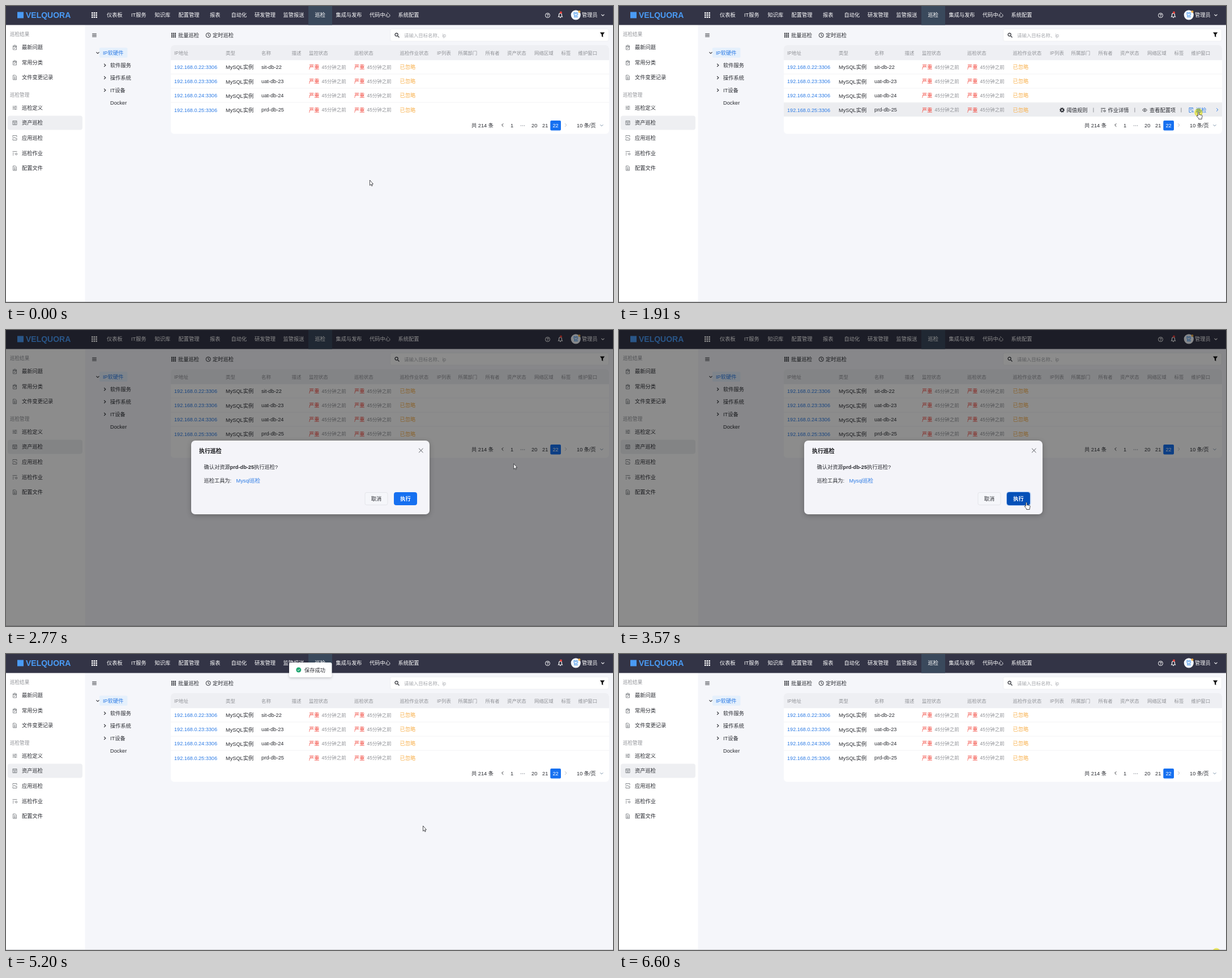
Recreate the animation shown at these times as an HTML page with a canvas. Size 1072x522 px, loop 6.76 s.

```html
<!DOCTYPE html>
<html lang="zh-CN">
<head>
<meta charset="utf-8">
<title>资产巡检</title>
<style>
html, body { margin: 0; width: 100%; height: 100%; overflow: hidden; background: #f5f6fa; }
canvas { display: block; width: 1072px; height: 522px; }
</style>
</head>
<body>
<canvas id="stage" width="1072" height="522"></canvas>
<script>
const ctx = document.getElementById('stage').getContext('2d');
const LOOP = 6760;
const FONT = '"Liberation Sans", "Noto Sans CJK SC", "Noto Sans CJK", sans-serif';
const BLUE = '#1670f0', LINK = '#2c7be5', INK = '#2b2d33', GREY = '#909297';
const BODY = 9.22, SMALL = 8.45;

// Pointer moves: start, last step, step count, x, y
const START = [642.5, 307];
const MOVES = [
  [420, 1040, 9, 1030, 175],
  [1120, 1290, 3, 1036, 176],
  [1440, 1910, 6, 1023.5, 187],
  [2470, 3080, 9, 719.5, 304],
  [5200, 5200, 1, 736.5, 303],
  [5278, 5810, 8, 943, 389],
  [5890, 6360, 7, 1055, 525]
];

const ICONS = {
  clip: 'M-3 -3H3V4H-3ZM-1 -4H1M-1.5 1L-.3 2L2 -1M-3 -1.5H3',
  doc: 'M-3 -4H1L3 -2V4H-3ZM-1.5 -1H1.5M-1.5 .8H1.5M-1.5 2.5H1.5',
  tune: 'M-4 -2.5H4M-4 0H4M-4 2.5H4M1.5 -3.5V-1.5M-1.5 -1V1M1 1.5V3.5',
  list: 'M-3.5 -3.5H3.5V3.5H-3.5ZM-3.5 -1.5H3.5M-1.8 .3H1.8M-1.8 2H1.8',
  app: 'M-3.5 -1.5V-4H3.5V-1.5M-3.5 1.5V4H3.5V1.5M-4 0H-1L0 -1.2L1 .8H4',
  job: 'M-4 -3H4M-4 0H-1M-4 3H-1.5M1 1.5A1.6 1.6 0 1 0 4.2 1.5A1.6 1.6 0 1 0 1 1.5',
  scan: 'M3 -1V-4H-3.5V4H0M-1.8 -2H1.5M-1.8 0H.5M1 2.3A1.3 1.3 0 1 0 3.6 2.3A1.3 1.3 0 1 0 1 2.3M3.4 3.2L4.4 4.2',
  eye: 'M-4 0Q0 -5.5 4 0Q0 5.5 -4 0ZM-1.1 0A1.1 1.1 0 1 0 1.1 0A1.1 1.1 0 1 0 -1.1 0',
  clock: 'M-4 0A4 4 0 1 0 4 0A4 4 0 1 0 -4 0M0 -2.5V.3L2 1.3',
  lens: 'M-3.5 -1A2.6 2.6 0 1 0 1.7 -1A2.6 2.6 0 1 0 -3.5 -1M1 1L4 4',
  bell: 'M-3.5 2.5H3.5L2.5 1V-1Q2.2 -3.6 0 -3.6Q-2.2 -3.6 -2.5 -1V1ZM-1 4H1',
  menu: 'M-3.8 -2.5H3.8M-3.8 0H3.8M-3.8 2.5H3.8',
  down: 'M-2.5 -1.2L0 1.3L2.5 -1.2',
  right: 'M-1.3 -2.7L1.4 0L-1.3 2.7',
  left: 'M1.3 -2.7L-1.4 0L1.3 2.7',
  cross: 'M-3.7 -3.7L3.7 3.7M3.7 -3.7L-3.7 3.7',
  tick: 'M-2 0L-.5 1.5L2 -1.3'
};
const ARROW = new Path2D('M0 0V9.4L2 7.6L3.4 10.5L4.7 9.9L3.4 7H6Z');
const HAND = new Path2D('M-1 .8Q0 -.7 1 .8V4.6L5.3 5.4Q6.8 5.8 6.6 7.3L5.7 11V12.5H.2V11.2L-3.2 7.3Q-3.4 5.7 -1.8 6.2L-1 7Z');

function text(s, x, y, color = INK, size = BODY, weight = '') {
  ctx.font = `${weight} ${size}px ${FONT}`;
  ctx.fillStyle = color;
  ctx.fillText(s, x, y + size * 0.37);
  return x + ctx.measureText(s).width;
}

function box(x, y, w, h, r, fill, stroke) {
  ctx.beginPath();
  ctx.roundRect(x, y, w, h, r);
  if (fill) { ctx.fillStyle = fill; ctx.fill(); }
  if (stroke) { ctx.strokeStyle = stroke; ctx.lineWidth = 1; ctx.stroke(); }
}

function disc(x, y, r, fill) {
  ctx.beginPath();
  ctx.arc(x, y, r, 0, Math.PI * 2);
  ctx.fillStyle = fill;
  ctx.fill();
}

function icon(name, x, y, color = INK, width = 0.9) {
  ctx.save();
  ctx.translate(x, y);
  ctx.strokeStyle = color;
  ctx.lineWidth = width;
  ctx.stroke(new Path2D(ICONS[name]));
  ctx.restore();
}

function dots(x, y, step, size, color) {
  ctx.fillStyle = color;
  for (let i = 0; i < 9; i++) {
    ctx.fillRect(x + (i % 3 - 1) * step - size / 2, y + (Math.floor(i / 3) - 1) * step - size / 2, size, size);
  }
}

function shadowed(blur, alpha, draw) {
  ctx.save();
  ctx.shadowColor = `rgba(0,0,0,${alpha})`;
  ctx.shadowBlur = blur;
  ctx.shadowOffsetY = 2;
  draw();
  ctx.restore();
}

function topBar() {
  box(0, 0, 1072, 33.4, 0, '#333446');
  box(534, 0, 42, 33.4, 0, '#3a495c');
  box(20, 10.5, 11, 11, 0, '#4a9bf5');
  text('VELQUORA', 35, 16, '#4a9bf5', 14, 'bold');
  dots(156, 16, 3.7, 2.5, '#fff');
  const tabs = [['仪表板', 178], ['IT服务', 221], ['知识库', 262.5], ['配置管理', 304.5], ['报表', 360],
    ['自动化', 397.5], ['研发管理', 439], ['监管报送', 489.5], ['巡检', 545.5], ['集成与发布', 582.5],
    ['代码中心', 642], ['系统配置', 692.5]];
  tabs.forEach(([s, x]) => text(s, x, 16, '#fff'));
  ctx.beginPath();
  ctx.arc(956.5, 16.5, 4, 0, 7);
  ctx.strokeStyle = '#fff';
  ctx.lineWidth = 1;
  ctx.stroke();
  text('?', 954.4, 16.5, '#fff', 7, 'bold');
  icon('bell', 979, 16.5, '#fff', 1.1);
  disc(980, 11.5, 2, '#f0433c');
  disc(1006.3, 15.8, 8.6, '#f3f7fd');
  text('管', 1001.8, 16, '#5aa2ee', 9, 'bold');
  disc(1012.5, 10, 2, '#f4b24a');
  text('管理员', 1017, 16, '#fff');
  icon('down', 1054, 16, '#fff', 1.1);
}

function sideBar() {
  box(0, 33.4, 139.5, 488.6, 0, '#fff');
  box(3, 193.5, 132, 25, 4, '#eeeff2');
  text('巡检结果', 7, 49.5, GREY, 8.55);
  text('巡检管理', 7, 156.5, GREY, 8.55);
  const items = [['clip', '最新问题', 73], ['clip', '常用分类', 100], ['doc', '文件变更记录', 126],
    ['tune', '巡检定义', 179.5], ['list', '资产巡检', 206], ['app', '应用巡检', 232.5],
    ['job', '巡检作业', 259.5], ['doc', '配置文件', 286]];
  items.forEach(([name, s, y]) => {
    icon(name, 15.5, y, '#696c72', 0.8);
    text(s, 28, y);
  });
}

function toolBar() {
  icon('menu', 156, 51.5, INK, 1.1);
  box(165, 73.5, 49.5, 17.5, 2, '#e5f0fc');
  icon('down', 162, 82.5, INK, 1.1);
  text('IP软硬件', 171, 82.5, LINK);
  ['软件服务', '操作系统', 'IT设备', 'Docker'].forEach((s, i) => {
    const y = 104.5 + i * 22;
    if (i < 3) icon('right', 174.5, y, INK, 1.1);
    text(s, 184, y);
  });
  dots(296, 51.5, 3, 2.1, INK);
  text('批量巡检', 304, 51.5);
  icon('clock', 357.2, 51.5, INK, 1);
  text('定时巡检', 365, 51.5);
  box(678.5, 40.5, 386, 21.5, 3, '#fff', '#eeeff2');
  icon('lens', 690.5, 51.5, INK, 1.2);
  text('请输入目标名称、ip', 703, 52, '#a6a8ad', SMALL);
  ctx.fillStyle = '#111';
  ctx.fill(new Path2D('M1049 46.5H1057.3L1054.3 50.5V55L1052 53.5V50.5Z'));
}

function rowActions(hot) {
  const y = 183.5;
  disc(782.5, y, 3.3, INK);
  ctx.setLineDash([1.5, 1.3]);
  ctx.strokeStyle = INK;
  ctx.lineWidth = 1.6;
  ctx.beginPath();
  ctx.arc(782.5, y, 3.6, 0, 7);
  ctx.stroke();
  ctx.setLineDash([]);
  disc(782.5, y, 1.5, '#ecedf0');
  text('阈值规则', 790.5, y);
  icon('job', 855, y);
  text('作业详情', 863.5, y);
  icon('eye', 928.5, y);
  text('查看配置项', 937, y);
  icon('scan', 1010.5, y, hot ? LINK : INK);
  text('巡检', 1019, y, hot ? LINK : INK);
  [837.5, 910.5, 992.5].forEach(x => box(x, 179.5, 0.8, 8, 0, '#777a80'));
  icon('right', 1056.5, 183, LINK, 1);
}

function table(hover, hot) {
  box(291, 69, 774, 156.5, 6, '#fff');
  box(291, 69, 774, 26.5, [6, 6, 0, 0], '#eeeff3');
  const heads = [['IP地址', 297], ['类型', 388], ['名称', 451], ['描述', 504.5], ['监控状态', 535],
    ['巡检状态', 615], ['巡检作业状态', 695.5], ['IP列表', 761], ['所属部门', 798.5], ['所有者', 846.5],
    ['资产状态', 885], ['网络区域', 933], ['标签', 980.5], ['维护窗口', 1010.5]];
  heads.forEach(([s, x]) => text(s, x, 82.5, GREY, SMALL));
  [120, 145, 170].forEach(y => box(291, y - 0.5, 774, 1, 0, '#f3f4f6'));
  if (hover) box(291, 170.5, 774, 24.5, 0, '#ecedf0');
  ['sit', 'uat', 'uat', 'prd'].forEach((env, i) => {
    const y = 107.7 + i * 25.15, n = 22 + i;
    text(`192.168.0.${n}:3306`, 297, y, LINK, 9.12);
    text('MySQL实例', 388, y + 0.3);
    text(`${env}-db-${n}`, 451, y - 0.3);
    [535, 615].forEach(x => {
      text('严重', x, y, '#f2453b');
      text('45分钟之前', x + 22.5, y, GREY, SMALL);
    });
    text('已忽略', 695.5, y, '#f8b04c');
  });
  if (hover) rowActions(hot);
  pager();
}

function pager() {
  const y = 211;
  text('共 214 条', 822, y);
  icon('left', 877, 210, INK, 1);
  text('1', 891, y);
  [909.5, 912.5, 915.5].forEach(x => disc(x, 211, 0.9, '#b4b7bd'));
  text('20', 928, y);
  text('21', 947, y);
  box(961.3, 202, 18.7, 17.6, 2, BLUE);
  text('22', 965.4, y, '#fff');
  icon('right', 988.5, 210, '#b9bcc2', 1);
  text('10 条/页', 1008, 210.2);
  icon('down', 1052, 210.5, '#7890a8', 1);
}

function button(s, x, y, fill, stroke, color, weight) {
  box(x + 0.5, y + 0.5, 40, 22, 3, fill, stroke);
  text(s, x + 11.3, y + 12, color, BODY, weight);
}

function modal(t, onButton) {
  box(0, 0, 1072, 522, 0, 'rgba(0,0,0,.45)');
  const ready = t >= 2240;
  const top = ready ? 195 : 214;
  shadowed(8, 0.25, () => box(327, top, 421, ready ? 130 : 92.5, 7, '#f4f4f9'));
  text('执行巡检', 341, top + 18.5, '#17181c', 9.9, 'bold');
  icon('cross', 732.8, top + 17.5, '#55575d', 1);
  if (!ready) {
    button('取消', 685, 267, '#f5f6fa', '#e4e5ea', INK);
    return;
  }
  let x = text('确认对资源', 349.5, 241.5);
  x = text('prd-db-25', x, 241.5, INK, BODY, 'bold');
  text('执行巡检?', x, 241.5);
  text('巡检工具为:', 349.5, 265.5);
  text('Mysql巡检', 406.5, 265.5, LINK);
  button('取消', 633.5, 286, '#f5f6fa', '#e4e5ea', INK);
  if (t >= 3330) box(684.5, 285.5, 42.5, 24, 4, null, '#a9c9f5');
  const fill = onButton ? '#0550b8' : BLUE;
  button('执行', 685, 286, fill, fill, '#fff', 'bold');
}

function loading(t) {
  const a = (t - 4030) / 1000 * Math.PI * 2 + 0.7;
  ctx.beginPath();
  ctx.arc(678.3, 283, 5.6, a, a + 5.2);
  ctx.strokeStyle = LINK;
  ctx.lineWidth = 1.1;
  ctx.stroke();
  text('加载中', 664.3, 296.5, LINK);
}

function toast(t) {
  const shown = Math.min(1, Math.max(0, (t - 4108) / 300)) * Math.min(1, Math.max(0, (5810 - t) / 240));
  if (!shown) return;
  ctx.save();
  ctx.globalAlpha = shown;
  ctx.translate(0, (shown - 1) * 27);
  shadowed(4, 0.18, () => box(500, 15, 75.5, 26, 3, '#fff'));
  disc(516.8, 28, 4.5, '#22a873');
  icon('tick', 516.8, 28, '#fff', 1);
  text('保存成功', 527, 28.3);
  ctx.restore();
}

function pointerAt(t) {
  let [x, y] = START;
  for (const [from, to, n, nx, ny] of MOVES) {
    if (t < from) break;
    const gap = n > 1 ? (to - from) / (n - 1) : 1;
    let p = Math.min(1, (Math.floor((t - from) / gap + 1e-6) + 1) / n);
    if (n === 9) p = p * p * (3 - 2 * p);
    x += (nx - x) * p;
    y += (ny - y) * p;
  }
  return [x, y];
}

function pointer(x, y, hand, click) {
  ctx.save();
  if (click) {
    ctx.globalCompositeOperation = 'multiply';
    disc(x, y + 0.8, 7.2, '#f6f268');
    ctx.globalCompositeOperation = 'source-over';
  }
  ctx.translate(x, y);
  const shape = hand ? HAND : ARROW;
  ctx.fillStyle = '#fff';
  ctx.fill(shape);
  ctx.strokeStyle = '#25262b';
  ctx.lineWidth = 0.8;
  ctx.stroke(shape);
  ctx.restore();
}

function render(t) {
  const [x, y] = pointerAt(t);
  const open = t >= 2090 && t < 4030;
  const busy = t >= 4030 && t < 4262;
  const hover = t < 2090 && y >= 170 && y < 195 && x > 291;
  const hot = hover && x > 1005 && x < 1039;
  const onButton = open && t >= 2240 && x > 685 && x < 726 && y > 286 && y < 309;
  const click = (t >= 1910 && t < 2090) || (t >= 3330 && t < 3570) || t >= 6600;

  box(0, 0, 1072, 522, 0, '#f5f6fa');
  sideBar();
  topBar();
  toolBar();
  if (busy) loading(t);
  else table(hover, hot);
  box(0, 521, 1072, 1, 0, '#cbccd0');
  if (open) modal(t, onButton);
  toast(t);
  pointer(x, y, hot || onButton, click);
}

const origin = performance.now();
function tick() {
  render((performance.now() - origin) % LOOP);
  requestAnimationFrame(tick);
}
tick();
</script>
</body>
</html>
```
